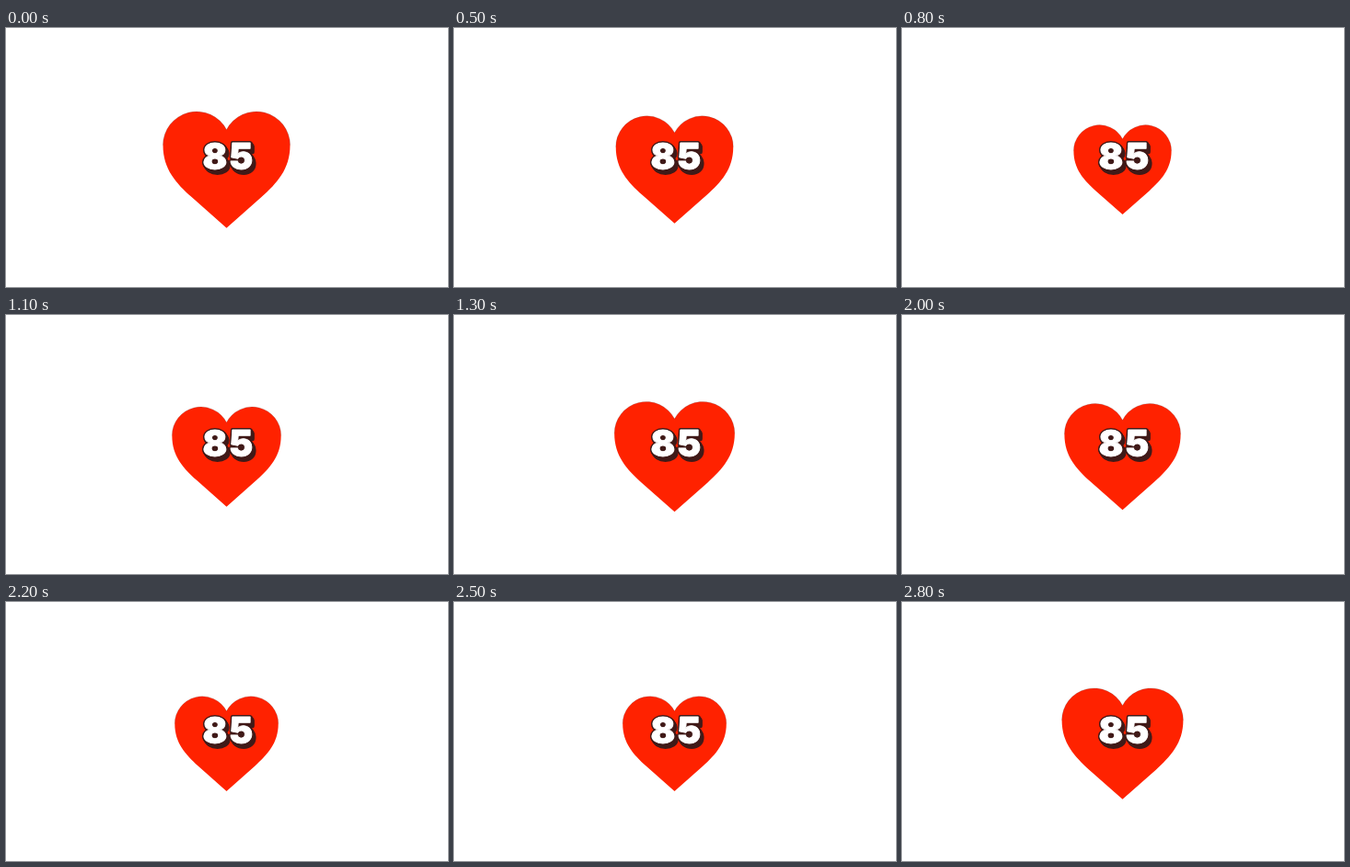
An HTML page that plays this animation: 480x282 px, repeating every 2900 ms.

```html
<!DOCTYPE html>
<html lang="en">
<head>
<meta charset="utf-8">
<title>Heartbeat</title>
<style>
  html, body { margin: 0; width: 100%; height: 100%; overflow: hidden; background: #fff; }
  svg { display: block; width: 100vw; height: 100vh; }
  text { font: 900 39.5px Inter, sans-serif; letter-spacing: 2.4px; text-anchor: middle; }
</style>
</head>
<body>
<svg viewBox="0 0 480 282">
  <g id="heart">
    <path fill="#ff2200" d="M0 -6.33 A5.3 5.3 0 0 1 10 -3.88 C10 -.1 7.9 2.1 5.5 4.3 L0 9.17 L-5.5 4.3 C-7.9 2.1 -10 -.1 -10 -3.88 A5.3 5.3 0 0 1 0 -6.33 Z"/>
    <path fill="none" stroke="#502020" stroke-opacity=".4" stroke-width=".08" d="M-10 -3.88 A5.3 5.3 0 0 1 0 -6.33 A5.3 5.3 0 0 1 10 -3.88"/>
  </g>
  <g id="label"></g>
</svg>
<script>
  const LOOP = 2900, STEP = 100;
  const PERIOD = 1478, PEAK = 132;
  const MIN_W = 100, MAX_W = 140;
  const heart = document.getElementById('heart');
  const label = document.getElementById('label');

  function addText(dx, dy, color, stroke) {
    const el = document.createElementNS('http://www.w3.org/2000/svg', 'text');
    const attrs = {
      x: 242.2 + dx, y: 154.3 + dy, fill: color,
      stroke: color, 'stroke-width': stroke, 'stroke-linejoin': 'round'
    };
    for (const key in attrs) el.setAttribute(key, attrs[key]);
    el.textContent = '85';
    label.appendChild(el);
  }

  // Dark extrusion below the white digits
  for (let i = 0; i <= 6; i++) addText(i * 0.45, i * 0.55, '#401a18', 3.8);
  addText(0, 0, '#fff', 0.9);

  // cubic-bezier(0, 0, .58, 1), solved by bisection
  function easeOut(x) {
    let lo = 0, hi = 1;
    for (let i = 0; i < 24; i++) {
      const s = (lo + hi) / 2;
      if (3 * 0.58 * s * s * (1 - s) + s * s * s < x) lo = s; else hi = s;
    }
    return lo * lo * (3 - 2 * lo);
  }

  function draw(ms) {
    const t = Math.floor((ms % LOOP) / STEP) * STEP;
    const cycle = (t - PEAK) / PERIOD;
    const away = Math.abs(cycle - Math.round(cycle)) * 2;
    const width = MIN_W + (MAX_W - MIN_W) * easeOut(1 - away);
    heart.setAttribute('transform', `translate(239.5 154.4) scale(${width / 20})`);
  }

  const start = performance.now();
  function tick() {
    draw(performance.now() - start);
    requestAnimationFrame(tick);
  }
  tick();
</script>
</body>
</html>
```
